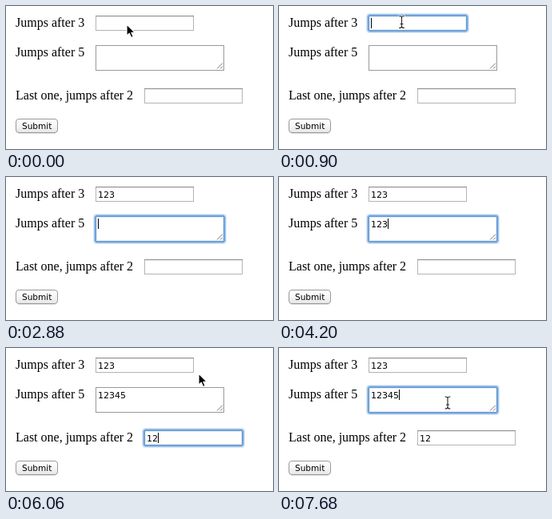
These frames come from a looping animation (334 px wide and 179 px high, 8 s). An HTML page:

```html
<!DOCTYPE html>
<html lang="en">
<head>
<meta charset="utf-8">
<title>Auto-advancing form</title>
<style>
html, body { margin: 0; width: 100%; height: 100%; overflow: hidden; background: #fff; }
svg { display: block; width: 100vw; height: 100vh; }
.label { font: 16px "Liberation Serif", serif; }
.value { font: 11px "DejaVu Sans", sans-serif; }
.button { font: 10.5px "DejaVu Sans", sans-serif; }
</style>
</head>
<body>
<svg id="stage" viewBox="0 0 334 179">
  <defs>
    <linearGradient id="face" x2="0" y2="1">
      <stop offset="0" stop-color="#fff"/>
      <stop offset=".5" stop-color="#f6f6f6"/>
      <stop offset="1" stop-color="#e6e6e6"/>
    </linearGradient>
  </defs>
  <rect width="334" height="179" fill="#fff"/>
  <g class="label">
    <text x="12" y="26">Jumps after 3</text>
    <text x="12" y="63">Jumps after 5</text>
    <text x="12" y="117">Last one, jumps after 2</text>
  </g>
  <rect x="12.5" y="141.5" width="52" height="17" rx="3.5" fill="url(#face)" stroke="#999"/>
  <path d="M15 159.5H62" stroke="#ccc" opacity=".6"/>
  <text class="button" x="20" y="154">Submit</text>
  <g id="fields"></g>
  <g id="arrow">
    <path d="M0 0V14.2L3.3 11.2L5.7 16.6L8.2 15.5L5.9 10.3H10.3Z" fill="#000" stroke="#fff" stroke-width="1.2" stroke-linejoin="round"/>
  </g>
  <g id="beam" fill="none" stroke-linecap="round">
    <path d="M-3 -7.5Q0 -7.5 0 -5.5Q0 -7.5 3 -7.5M0 -5.5V5.5M-3 7.5Q0 7.5 0 5.5Q0 7.5 3 7.5M-1.5 2.5H1.5" stroke="#fff" stroke-width="2.6"/>
    <path d="M-3 -7.5Q0 -7.5 0 -5.5Q0 -7.5 3 -7.5M0 -5.5V5.5M-3 7.5Q0 7.5 0 5.5Q0 7.5 3 7.5M-1.5 2.5H1.5" stroke="#222" stroke-width="1.1"/>
  </g>
</svg>
<script>
const LOOP = 8000, STEP = 60, DIGIT = 7;
const byId = id => document.getElementById(id);

function add(parent, tag, attrs) {
  const el = document.createElementNS("http://www.w3.org/2000/svg", tag);
  for (const key in attrs) el.setAttribute(key, attrs[key]);
  return parent.appendChild(el);
}

// keys: when each digit appears; focus: [from, to] spans
const fields = [
  { x: 112, y: 12, w: 123, h: 19, caretY: 15, keys: [2280, 2520, 2760], focus: [[660, 2880]] },
  { x: 112, y: 49, w: 161, h: 32, caretY: 52, keys: [3660, 3900, 4200, 4500, 4740],
    focus: [[2880, 4860], [7620, LOOP]], area: true },
  { x: 173, y: 103, w: 123, h: 19, caretY: 106, keys: [5700, 5880], focus: [[4860, 6120]] }
];
const caretOff = [[1740, 2160], [3360, 3660], [5340, 5700]];

// Pointer path: time, x, y, shape
const path = [
  [0, 151, 23, "arrow"], [60, 151, 23, "beam"], [600, 153.5, 20, "beam"],
  [900, 153.5, 20, "beam"], [1080, 163, 11, "arrow"], [1320, 185, -20, "arrow"],
  [5880, 254, -20, "arrow"], [6060, 241, 32, "arrow"], [6240, 227, 50, "beam"],
  [6360, 220.5, 57, "beam"], [6540, 220.5, 57, "beam"], [6720, 211, 69, "beam"],
  [6960, 211, 68.5, "beam"]
];

function buildField(f) {
  const g = add(byId("fields"), "g", {});
  const { x, y, w, h } = f;
  const frame = (grow, attrs) => add(f.ring, "rect", {
    x: x - grow, y: y - grow, width: w + 2 * grow, height: h + 2 * grow, fill: "none", ...attrs
  });
  add(g, "rect", { x: x + .5, y: y + .5, width: w - 1, height: h - 1, fill: "#fff", stroke: f.area ? "#999" : "#b4b4b4" });
  if (!f.area) {
    add(g, "path", { d: `M${x} ${y + .5}h${w}`, stroke: "#8f8f8f" });
    add(g, "path", { d: `M${x + 1} ${y + 1.5}h${w - 2}`, stroke: "#eee" });
  } else {
    add(g, "path", { d: `M${x + w - 9} ${y + h - 2.5}l7 -7m-3 7l3 -3`, stroke: "#777", fill: "none" });
  }
  f.ring = add(g, "g", {});
  frame(2.5, { rx: 3, stroke: "#dce9f7" });
  frame(1.5, { rx: 2.5, stroke: "#a3c6ec" });
  frame(.5, { rx: 1.5, stroke: "#73a7df" });
  frame(-.5, { stroke: "#6c9cce" });
  frame(-1.5, { stroke: "#e3eefa" });
  f.text = add(g, "text", { class: "value", x: x + 3, y: f.caretY + 11 });
  f.caret = add(g, "rect", { y: f.caretY, width: 1, height: 13, fill: "#000" });
}

const within = (t, spans) => spans.some(([a, b]) => t >= a && t < b);
const show = (el, on) => el.setAttribute("visibility", on ? "visible" : "hidden");

function drawPointer(t) {
  let i = path.length - 1;
  while (path[i][0] > t) i--;
  const [t0, x0, y0, shape] = path[i];
  const [t1, x1, y1] = path[i + 1] || [LOOP, x0, y0];
  const k = (t - t0) / (t1 - t0);
  const place = `translate(${x0 + (x1 - x0) * k} ${y0 + (y1 - y0) * k})`;
  for (const id of ["arrow", "beam"]) {
    byId(id).setAttribute("transform", place);
    show(byId(id), id === shape);
  }
}

function draw(time) {
  const t = Math.floor(time / STEP) * STEP;
  for (const f of fields) {
    const n = f.keys.filter(k => t >= k).length;
    const focused = within(t, f.focus);
    f.text.textContent = "12345".slice(0, n);
    f.caret.setAttribute("x", f.x + 3 + n * DIGIT);
    show(f.ring, focused);
    show(f.caret, focused && !within(t, caretOff));
  }
  drawPointer(t);
}

fields.forEach(buildField);
const start = performance.now();
function tick() {
  draw((performance.now() - start) % LOOP);
  requestAnimationFrame(tick);
}
tick();
</script>
</body>
</html>
```
